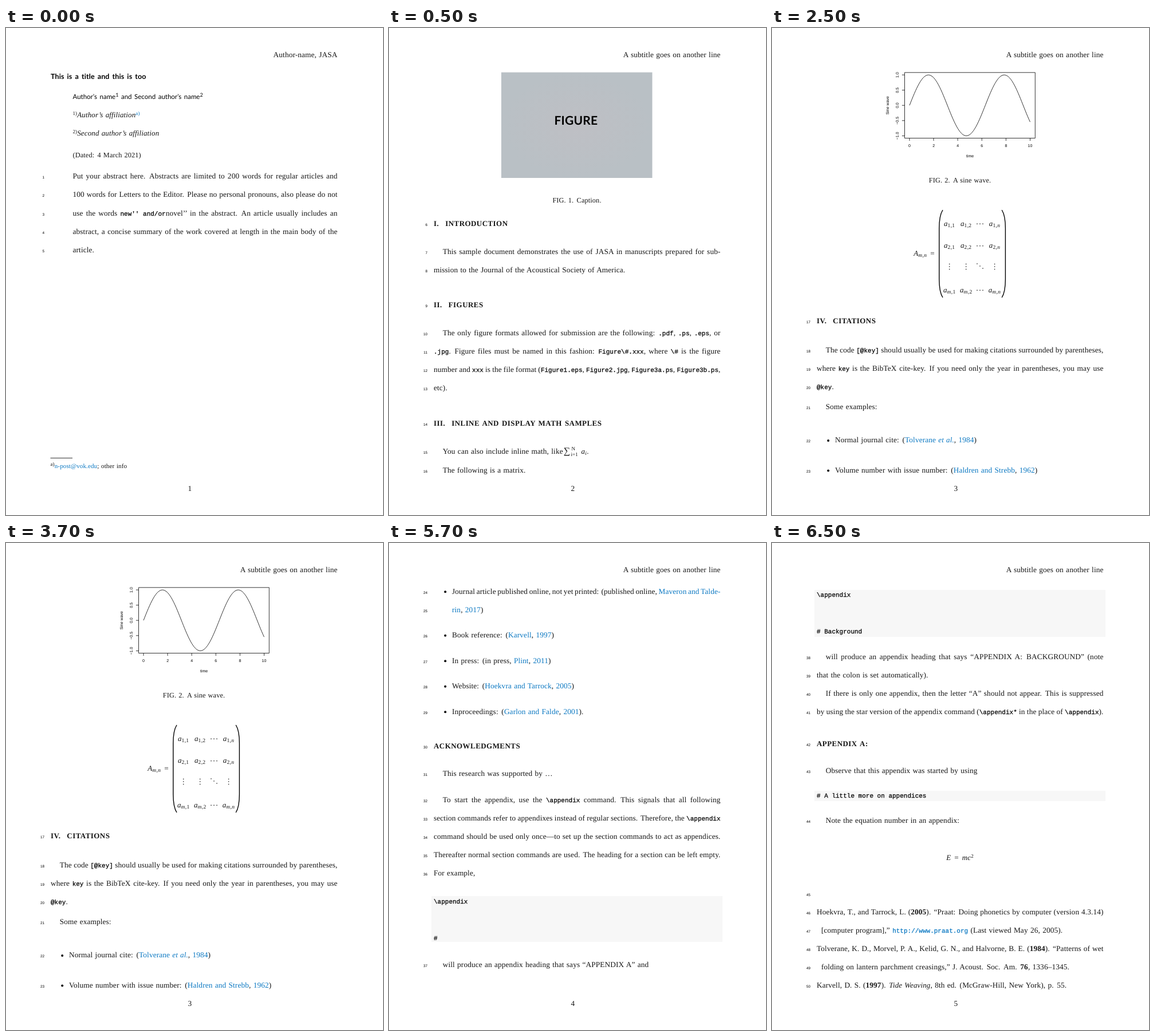
Recreate the animation shown at these times as an HTML page. Size 658x851 px, loop 8 s.

```html
<!DOCTYPE html>
<html lang="en">
<head>
<meta charset="utf-8">
<title>Manuscript pages</title>
<style>
html, body { margin: 0; width: 100%; height: 100%; overflow: hidden; background: #fff; }
svg { display: block; width: 658px; height: 851px; }
text { font: 13.3px "Liberation Serif", serif; letter-spacing: .12px; word-spacing: .8px; fill: #161616; text-rendering: geometricPrecision; }
.r { text-anchor: end; }
.c { text-anchor: middle; }
.n { font: 6.4px "Liberation Sans", sans-serif; letter-spacing: 0; fill: #000; }
.title { font: bold 12.5px Lato, sans-serif; letter-spacing: .1px; word-spacing: 1.9px; fill: #000; }
.author { font: 11.5px Lato, sans-serif; letter-spacing: 0; word-spacing: 1.6px; fill: #000; }
.small { font-size: 12.3px; }
.foot { font-size: 11px; }
.head { font-weight: bold; font-size: 13px; letter-spacing: .44px; word-spacing: 1.4px; }
.fig { font: bold 21px Lato, sans-serif; letter-spacing: .2px; fill: #000; }
.eq { word-spacing: 2.5px; }
.axis { font: 7px "Liberation Sans", sans-serif; letter-spacing: 0; word-spacing: 0; fill: #000; }
.m { font-family: "Liberation Mono", monospace; font-size: 11px; letter-spacing: 0; word-spacing: 0; fill: #000; stroke: #000; stroke-width: .25px; }
.m .a { stroke: #0b78c2; }
.i { font-style: italic; font-size: 13px; }
.b { font-weight: bold; }
.a, .a tspan { fill: #0b78c2; }
.sup { font-size: 9px; baseline-shift: 4.5px; }
.sub { font-size: 9.5px; letter-spacing: .3px; baseline-shift: -2px; }
.sub .i { font-size: 9.5px; letter-spacing: .4px; }
.limit { font-size: 9px; }
.w { letter-spacing: 1.5px; }
.line { fill: none; stroke: #000; stroke-width: .8; }
</style>
</head>
<body>
<svg viewBox="0 0 658 851">
  <defs>
    <radialGradient id="grey">
      <stop offset="0" stop-color="#bebfc4"/>
      <stop offset="1" stop-color="#b9c0c5"/>
    </radialGradient>
  </defs>
</svg>
<script>
const svg = document.querySelector('svg');
const RIGHT = 578.5;
let lineNo = 0, pageNo = 0;

// Inline markup: `code` {link} _italic_ ~bold~ ^superscript^ |subscript|
const marks = [[/`(.+?)`/g, 'm'], [/_(.+?)_/g, 'i'], [/\{(.+?)\}/g, 'a'],
  [/~(.+?)~/g, 'b'], [/\^(.+?)\^/g, 'sup'], [/\|(.+?)\|/g, 'sub']];
const format = s => marks.reduce(
  (out, [re, c]) => out.replace(re, `<tspan class="${c}">$1</tspan>`),
  String(s).replace(/([a-z\d)`]\.|:) /g, '$1<tspan class="w"> </tspan>'));

const text = (x, y, s, c = '', extra = '') =>
  `<text x="${x}" y="${y}" class="${c}" ${extra}>${format(s)}</text>`;
const dot = (x, y, r) => `<circle cx="${x}" cy="${y}" r="${r}"/>`;
const line = (y, s, x = 78, c = '') => text(67, y, ++lineNo, 'n r') + text(x, y, s, c);
const just = (y, s, x) => line(y, s, x, 'j');
const item = (y, s, c) => dot(98.2, y - 3.3, 2) + line(y, s, 110, c);
const head = (y, s, num = '') =>
  line(y, num ? `${num}<tspan dx="11">${s}</tspan>` : s, 78, 'head');
const code = (y, h, ...rows) =>
  `<rect x="74" y="${y}" width="508" height="${h}" fill="#f7f7f7"/>` +
  rows.map(([by, s]) => text(78, by, s, 'm')).join('');

function page(top, ...parts) {
  const g = document.createElementNS(svg.namespaceURI, 'g');
  g.innerHTML = text(RIGHT, 50.5, top, 'r') + parts.join('') + text(321, 809, ++pageNo, 'c');
  svg.append(g);
  return g;
}

function plot() {
  const px = x => 240 + 21.05 * x, py = y => 135.2 - 53.2 * y;
  let curve = '', ticks = '', labels = '';
  for (let i = 0; i <= 100; i++)
    curve += `${i ? 'L' : 'M'}${px(i / 10)} ${py(Math.sin(i / 10))}`;
  for (let x = 0; x <= 10; x += 2) {
    ticks += `M${px(x)} 192.5v4.6`;
    labels += text(px(x), 208, x, 'axis c');
  }
  const up = (x, y, s) => text(x, y, s, 'axis c', `transform="rotate(-90 ${x} ${y})"`);
  for (let y = -1; y <= 1; y += .5) {
    ticks += `M231.5 ${py(y)}h-4.6`;
    labels += up(221, py(y), y.toFixed(1).replace('-', '−'));
  }
  return `<path class="line" d="${curve}${ticks}M231.5 77.8H459.3V192.5H231.5Z"/>` +
    labels + text(345.5, 226, 'time', 'axis c') + up(204, 135.2, 'Sine wave');
}

function matrix() {
  const cols = [309.7, 338.7, 363, 388.6];
  const dots = (x, y, dx, dy) => [-1, 0, 1].map(k => dot(x + k * dx, y + k * dy, .8)).join('');
  let out = text(284, 398, '_A_|_m,n_| =', 'r eq');
  for (const [row, y] of [['1', 345.5], ['2', 384], ['_m_', 461.5]]) {
    ['1', '2', '', '_n_'].forEach((col, k) => {
      out += col ? text(cols[k], y, `_a_|${row},${col}|`, 'c') : dots(cols[k], y - 3.3, 5, 0);
    });
  }
  cols.forEach((x, k) => out += k === 2 ? dots(x, 416, 5, 4) : dots(x, 417, 0, 4.5));
  const paren = '<path class="line" style="stroke-width:1.4" d="M298 318C293 326 291.8 336 291.8 350V439C291.8 453 293 463 298 471"/>';
  return out + paren + `<g transform="matrix(-1 0 0 1 699.2 0)">${paren}</g>`;
}

const running = 'A subtitle goes on another line';

const pages = [
  page('Author-name, JASA',
    text(78, 88.5, 'This is a title and this is too', 'title'),
    text(116.5, 123.5, 'Author’s name^1^ and Second author’s name^2^', 'author'),
    text(116.5, 156, '^1)^_Author’s affiliation_{^a)^}'),
    text(116.5, 188, '^2)^_Second author’s affiliation_'),
    text(116.5, 226, '(Dated: 4 March 2021)', 'small'),
    just(263.3, 'Put your abstract here. Abstracts are limited to 200 words for regular articles and', 116.5),
    just(295.4, '100 words for Letters to the Editor. Please no personal pronouns, also please do not', 116.5),
    just(327.5, "use the words `new'' and/or`novel’’ in the abstract. An article usually includes an", 116.5),
    just(359.6, 'abstract, a concise summary of the work covered at length in the main body of the', 116.5),
    line(391.7, 'article.', 116.5),
    '<path class="line" d="M77.5 751.5H116"/>',
    text(77.5, 768.5, '^a)^{n-post@vok.edu}; other info', 'foot')),

  page(running,
    '<rect x="196" y="77.5" width="263.5" height="184.5" fill="url(#grey)"/>',
    text(326.3, 168.5, 'FIGURE', 'fig c'),
    text(328, 304.5, 'FIG. 1. Caption.', 'small c'),
    head(345.5, 'INTRODUCTION', 'I.'),
    just(394.5, 'This sample document demonstrates the use of JASA in manuscripts prepared for sub-', 93.7),
    line(426.5, 'mission to the Journal of the Acoustical Society of America.'),
    head(488, 'FIGURES', 'II.'),
    just(537, 'The only figure formats allowed for submission are the following: `.pdf`, `.ps`, `.eps`, or', 93.7),
    just(569, '`.jpg`. Figure files must be named in this fashion: `Figure\\#.xxx`, where `\\#` is the figure'),
    just(601, 'number and `xxx` is the file format (`Figure1.eps`, `Figure2.jpg`, `Figure3a.ps`, `Figure3b.ps`,'),
    line(633, 'etc).'),
    head(694.5, 'INLINE AND DISPLAY MATH SAMPLES', 'III.'),
    line(743.8, 'You can also include inline math, like', 93.7),
    text(304.8, 744, '∑', '', 'style="font-size:16px"'),
    text(318.5, 738, 'N', 'limit', 'font-style="italic"'),
    text(317.5, 748, 'i=1', 'limit'),
    text(335.5, 743.8, '_a_|_i_|.'),
    line(776.8, 'The following is a matrix.', 93.7)),

  page(running,
    plot(),
    text(328, 269.5, 'FIG. 2. A sine wave.', 'small c'),
    matrix(),
    head(516, 'CITATIONS', 'IV.'),
    just(567, 'The code `[@key]` should usually be used for making citations surrounded by parentheses,', 93.7),
    just(599, 'where `key` is the BibTeX cite-key. If you need only the year in parentheses, you may use'),
    line(631, '`@key`.'),
    line(666, 'Some examples:', 93.7),
    item(724.3, 'Normal journal cite: ({Tolverane _et al._}, {1984})'),
    item(776.8, 'Volume number with issue number: ({Haldren and Strebb}, {1962})')),

  page(running,
    item(88.5, 'Journal article published online, not yet printed: (published online, {Maveron and Talde-}', 'j'),
    line(120.5, '{rin}, {2017})', 110),
    item(165, 'Book reference: ({Karvell}, {1997})'),
    item(209.5, 'In press: (in press, {Plint}, {2011})'),
    item(254, 'Website: ({Hoekvra and Tarrock}, {2005})'),
    item(298.5, 'Inproceedings: ({Garlon and Falde}, {2001}).'),
    head(359.3, 'ACKNOWLEDGMENTS'),
    line(407.3, 'This research was supported by …', 93.7),
    just(452.8, 'To start the appendix, use the `\\appendix` command. This signals that all following', 93.7),
    just(485, 'section commands refer to appendixes instead of regular sections. Therefore, the `\\appendix`'),
    just(517.2, 'command should be used only once—to set up the section commands to act as appendices.'),
    just(549.3, 'Thereafter normal section commands are used. The heading for a section can be left empty.'),
    line(581.3, 'For example,'),
    code(617, 80, [630, '\\appendix'], [694, '#']),
    line(741, 'will produce an appendix heading that says “APPENDIX A” and', 93.7)),

  page(running,
    code(82, 82, [94, '\\appendix'], [158, '# Background']),
    just(202.5, 'will produce an appendix heading that says “APPENDIX A: BACKGROUND” (note', 93.7),
    line(234.5, 'that the colon is set automatically).'),
    just(267, 'If there is only one appendix, then the letter “A” should not appear. This is suppressed', 93.7),
    just(299, 'by using the star version of the appendix command (`\\appendix*` in the place of `\\appendix`).'),
    head(354.8, 'APPENDIX A:'),
    line(402.3, 'Observe that this appendix was started by using', 93.7),
    code(433, 18, [445, '# A little more on appendices']),
    line(489.3, 'Note the equation number in an appendix:', 93.7),
    text(328, 553.5, '_E_ = _mc_^2^', 'c eq'),
    line(616.5, ''),
    just(649, 'Hoekvra, T., and Tarrock, L. (~2005~). “Praat: Doing phonetics by computer (version 4.3.14)'),
    line(681, '[computer program],” `{http://www.praat.org}` (Last viewed May 26, 2005).', 86),
    just(713, 'Tolverane, K. D., Morvel, P. A., Kelid, G. N., and Halvorne, B. E. (~1984~). “Patterns of wet'),
    line(745, 'folding on lantern parchment creasings,” J. Acoust. Soc. Am. ~76~, 1336–1345.', 86),
    line(777, 'Karvell, D. S. (~1997~). _Tide Weaving_, 8th ed. (McGraw-Hill, New York), p. 55.'))
];

// Justify full lines by sharing the slack among the word spaces outside code.
for (const el of document.querySelectorAll('.j')) {
  const slack = RIGHT - el.getAttribute('x') - el.getComputedTextLength();
  const words = [...el.childNodes].filter(c => !c.classList?.contains('m'));
  const spaces = words.map(c => c.textContent).join('').split(' ').length - 1;
  el.style.wordSpacing = `${.8 + slack / spaces}px`;
}

const turns = [500, 2500, 4500, 6500];
function draw() {
  const t = performance.now() % 8000;
  const now = turns.filter(at => t >= at).length;
  pages.forEach((g, k) => g.style.display = k === now ? '' : 'none');
  requestAnimationFrame(draw);
}
draw();
</script>
</body>
</html>
```
